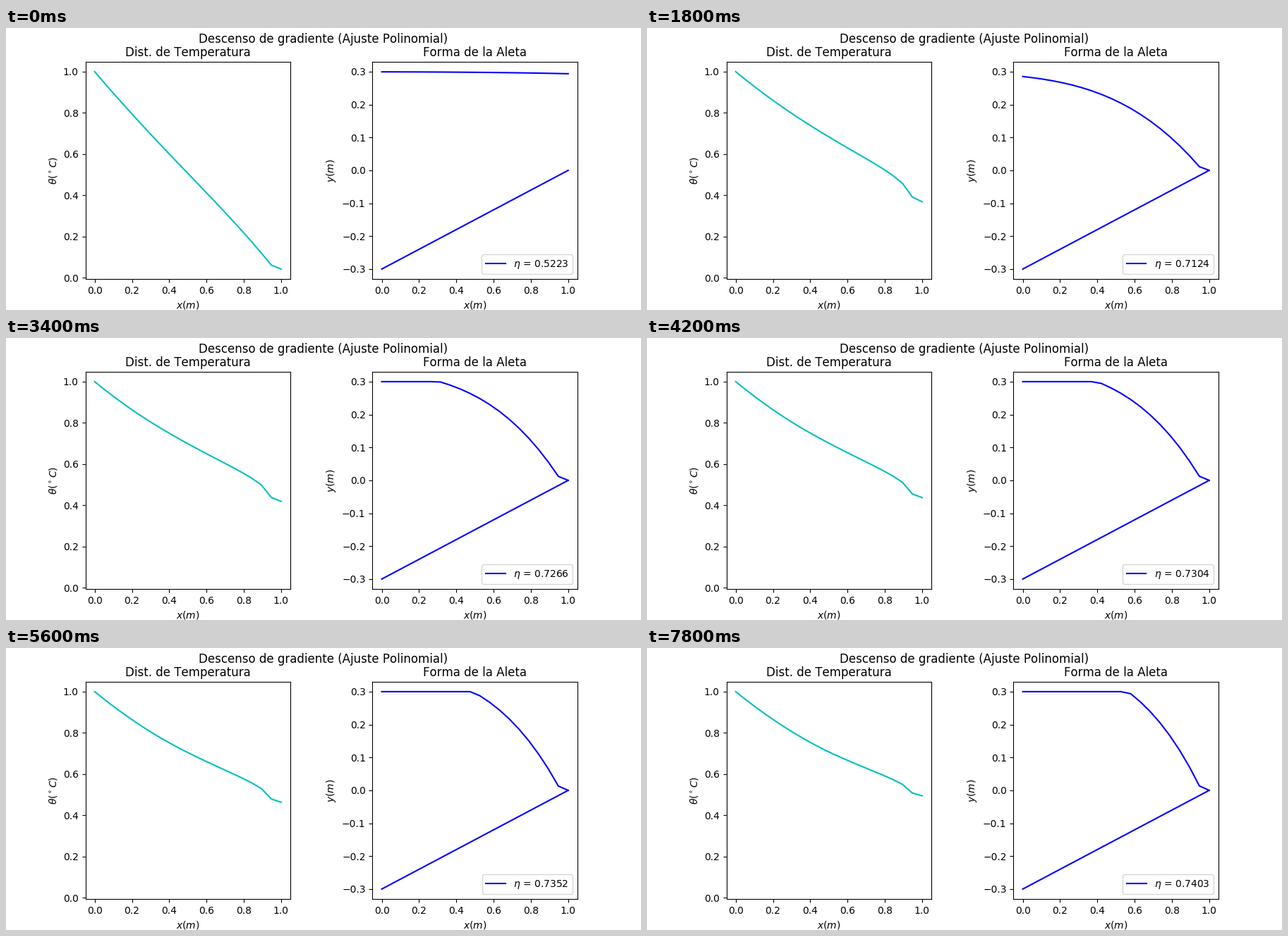
Animation of 900 by 400 pixels, one loop 8000 ms. Source, as a matplotlib script:

```python
import numpy as np
import matplotlib.pyplot as plt
from matplotlib.animation import FuncAnimation

plt.rcParams["text.kerning_factor"] = 6

FRAMES, INTERVAL = 40, 200
CONTACT = 6   # step at which the fin closes at its tip
N = 20
LOSS = 0.58   # convection / conduction ratio

x = np.linspace(0, 1, N)
lower = -0.3 + 0.3 * x
NODES = x[[0, 6, 12, 18]]


def mix(a, b, t):
    return a + (np.asarray(b) - a) * t


def opening(step):
    """The tip thins ever faster until it closes."""
    q = step / 4
    eta = 0.5223 + 0.0433 * q ** 1.3
    drop = 0.015 + 0.03 * x + 0.05 * x ** 2 + 0.064 * x ** 3
    upper = 0.3 - drop * (0.04 + 0.82 * q + 0.14 * q ** 2)
    ends = mix(np.array([0.062, 0.0427]), [0.0885, 0.0645], q ** 2)
    return eta, upper, ends


def settling(step):
    """The closed fin thickens at its base, slowing down logarithmically."""
    v = np.log((step - 3) / (CONTACT - 3)) / np.log((FRAMES - 4) / (CONTACT - 3))
    g = v ** 1.5
    eta = mix(0.695, 0.7403, v ** 0.75)
    heights = mix(np.array([0.264, 0.231, 0.153, 0.0106]),
                  [0.408, 0.370, 0.2685, 0.0135], g)
    upper = np.polyval(np.polyfit(NODES, heights, 3), x)
    ends = mix(np.array([0.372, 0.347]), [0.5085, 0.495], g)
    return eta, np.clip(upper, 0, 0.3), ends


def temperature(upper, ends):
    """Solve (t T')' = LOSS T with T = 1 at the base and known end values."""
    thick = upper - lower
    mid = np.sqrt(thick[:-1] * thick[1:])
    last = N - 2
    A = np.eye(N - 1)
    b = np.zeros(N - 1)
    b[0], b[last] = 1, ends[0]
    for i in range(1, last):
        A[i, i - 1] = mid[i - 1]
        A[i, i] = -mid[i - 1] - mid[i] - LOSS * x[1] ** 2
        A[i, i + 1] = mid[i]
    return np.append(np.linalg.solve(A, b), ends[1])


fig, (ax_temp, ax_fin) = plt.subplots(1, 2, figsize=(9, 4), dpi=100)
fig.subplots_adjust(wspace=0.4)
fig.suptitle("Descenso de gradiente (Ajuste Polinomial)", y=0.983)

ax_temp.set(title="Dist. de Temperatura", xlabel="$x(m)$",
            ylabel=r"$\theta (^\circ C)$",
            xlim=(-0.05, 1.05), ylim=(-0.0055, 1.0476))
ax_fin.set(title="Forma de la Aleta", xlabel="$x(m)$", ylabel="$y(m)$",
           xlim=(-0.05, 1.05), ylim=(-0.3302, 0.3298))

temp_line, = ax_temp.plot(x, x, "c")
fin_line, = ax_fin.plot(x, lower, "b", label=r"$\eta$ = 0.5223")
ax_fin.plot(x, lower, "b")
label = ax_fin.legend(loc="lower right").get_texts()[0]


def update(step):
    phase = opening if step < CONTACT else settling
    eta, upper, ends = phase(step)
    fin_line.set_ydata(upper)
    temp_line.set_ydata(temperature(upper, ends))
    label.set_text(rf"$\eta$ = {eta:.4f}")
    return temp_line, fin_line, label


anim = FuncAnimation(fig, update, frames=FRAMES, interval=INTERVAL,
                     init_func=lambda: update(0), repeat=True, repeat_delay=0)
plt.show()
```
